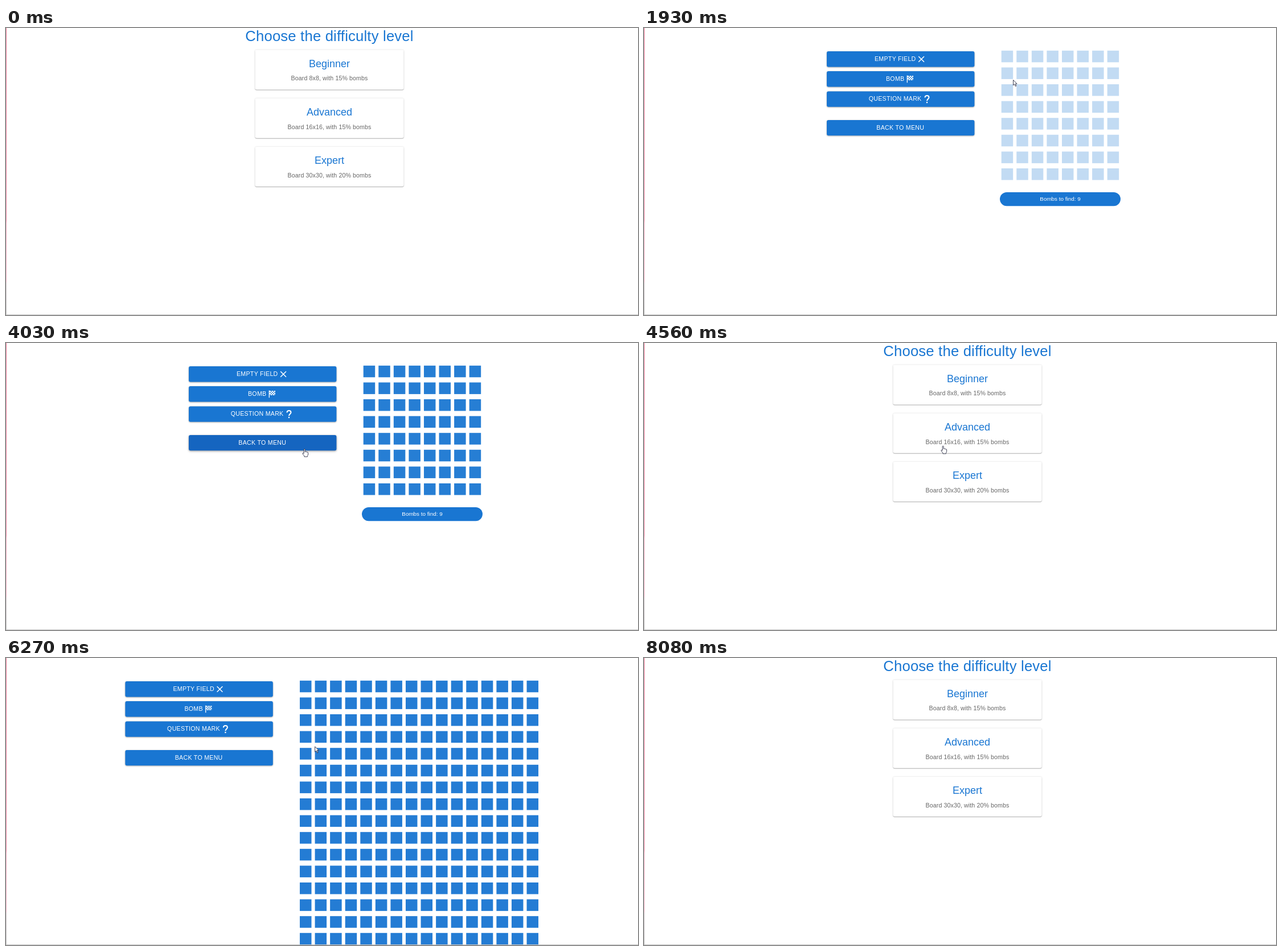
Animation of 1110 by 505 pixels, one loop 8.92 s. Source, as an HTML page:

```html
<!DOCTYPE html>
<html lang="en">
<head>
<meta charset="utf-8">
<title>Minesweeper levels</title>
<style>
  html, body { margin: 0; width: 100%; height: 100%; overflow: hidden; background: #fff; }
  svg { display: block; font-family: "Liberation Sans", Arial, sans-serif; }
  .title { font-size: 25.65px; letter-spacing: .19px; fill: #1976d2; }
  .level { font-size: 18px; fill: #1976d2; }
  .info { font-size: 10.6px; letter-spacing: .12px; fill: #666; }
  .card { fill: #fff; filter: drop-shadow(0 1px .4px rgba(0,0,0,.25)) drop-shadow(0 .3px .9px rgba(0,0,0,.16)); }
  .button { fill: #1976d2; filter: drop-shadow(0 1.2px .8px rgba(0,0,0,.26)) drop-shadow(0 .5px 1px rgba(0,0,0,.12)); }
  .button.hover { fill: #1565c0; filter: drop-shadow(0 1.6px 1.6px rgba(0,0,0,.3)) drop-shadow(0 1px 2px rgba(0,0,0,.14)); }
  .label { font-size: 10.6px; letter-spacing: .3px; fill: #fff; }
  .chip { font-size: 9.9px; fill: #fff; }
  .cell { fill: #1976d2; }
  .mid { text-anchor: middle; }
</style>
</head>
<body>
<svg id="stage" width="1110" height="505" viewBox="0 0 1110 505">
  <defs>
    <linearGradient id="edge" x1="0" y1="0" x2="0" y2="1">
      <stop offset="0" stop-color="#f094ac"/>
      <stop offset=".67" stop-color="#f29fb6"/>
      <stop offset=".68" stop-color="#f3b9ca"/>
      <stop offset=".88" stop-color="#f3c0cf"/>
      <stop offset=".89" stop-color="#dcd3d6"/>
      <stop offset="1" stop-color="#cfcfcf"/>
    </linearGradient>
  </defs>
  <rect width="1110" height="505" fill="#fff"/>
  <g id="menu"></g>
  <g id="game">
    <g id="panel"></g>
    <g id="small"></g>
    <g id="large"></g>
    <g id="counter">
      <rect x="625" y="289" width="212" height="24.2" rx="12.1" fill="#1976d2"/>
      <text class="chip mid" x="731" y="304.3">Bombs to find: 9</text>
    </g>
  </g>
  <rect width="1.3" height="505" fill="url(#edge)"/>
  <rect y="504" width="1110" height="1" fill="#c6c6c6"/>
  <circle id="click" r="9.3" fill="#ebe900" fill-opacity=".54"/>
  <g id="cursor" fill="#fff" stroke="#2b2d45" stroke-width=".9" stroke-linejoin="round">
    <path id="arrow" d="M.5.5V9.8L2.7 7.8 4.4 11.6 5.9 10.9 4.3 7.2H7.1Z"/>
    <path id="hand" d="M-.8 8V1.2Q-.8.2.2.2T1.2 1.2V5Q2.2 4.4 3 5.2 4 4.8 4.7 5.7 6.4 5.4 6.6 7V9.6Q6.5 11.4 5.4 12.2V13.8H-.1V12.4L-3 8.8Q-3.4 7.3-2 7.2Z"/>
  </g>
</svg>
<script>
const LOOP = 8920;
const $ = id => document.getElementById(id);

function add(parent, tag, attrs, text) {
  const el = document.createElementNS("http://www.w3.org/2000/svg", tag);
  for (const key in attrs) el.setAttribute(key, attrs[key]);
  if (text) el.textContent = text;
  parent.appendChild(el);
  return el;
}

const cards = [["Beginner", "8x8", 15], ["Advanced", "16x16", 15], ["Expert", "30x30", 20]].map(([name, size, share], i) => {
  const y = 38.4 + i * 85.3;
  add($("menu"), "rect", { class: "card", x: 437.3, y, width: 261.4, height: 70, rx: 3 });
  add($("menu"), "text", { class: "level mid", x: 568, y: y + 30.4 }, name);
  add($("menu"), "text", { class: "info mid", x: 568, y: y + 53.9 }, `Board ${size}, with ${share}% bombs`);
  return { x: 437.3, y, w: 261.4, h: 70 };
});
add($("menu"), "text", { class: "title mid", x: 568, y: 23 }, "Choose the difficulty level");

const buttons = [["EMPTY FIELD", 41, 405], ["BOMB", 76.1, 425], ["QUESTION MARK", 111.4, 394.7], ["BACK TO MENU", 161.9, 408.3]].map(([name, y, x]) => {
  const el = add($("panel"), "rect", { class: "button", x: 321, y, width: 259.4, height: 27.4, rx: 3 });
  add($("panel"), "text", { class: "label", x, y: y + 17 }, name);
  return { el, x: 321, y, w: 259.4, h: 27 };
});

// Button icons: cross, chequered flag, question mark
const line = (d, width) => add($("panel"), "path", { d, fill: "none", stroke: "#fff", "stroke-width": width });
line("M482.2 50 492 59.8M492 50 482.2 59.8", 1.5);
line("M462.3 83.6V96.2", 1.3);
for (let row = 0; row < 4; row++)
  for (let col = 0; col < 5; col++)
    add($("panel"), "rect", { x: 463 + col * 2, y: 84 + row * 2, width: 2, height: 2, fill: "#fff", "fill-opacity": (row + col) % 2 ? .3 : .95 });
line("M493.5 122.5Q493.5 119 497 119T500.5 122.3C500.5 124.6 497 125 497 128.3", 2);
add($("panel"), "rect", { x: 495.9, y: 129.9, width: 2.2, height: 2.2, fill: "#fff" });

function grid(parent, left, n) {
  for (let i = 0; i < n * n; i++)
    add(parent, "rect", { class: "cell", x: left + i % n * 26.57, y: 39.8 + Math.floor(i / n) * 29.6, width: 20.5, height: 20.5 });
}
grid($("small"), 627.7, 8);
grid($("large"), 516, 16);

// Pointer stops: time, x, y
const path = [
  [390, 1104, 498], [1060, 505, 66], [1450, 505, 66], [1900, 648, 91], [2170, 648, 91],
  [2690, 698, 311], [2930, 698, 311], [3510, 524, 189], [3990, 524, 189], [4040, 524, 186],
  [4350, 524, 186], [4500, 525, 181], [4600, 525, 181], [5030, 548, 154], [6150, 548, 154],
  [6950, 451, 176.5], [7350, 451, 176.5], [7940, 1027, 488], [8080, 1027, 488]
];
const clicks = [[1200, 1400], [3740, 3990], [5230, 5420], [7080, 7290]];
const games = [[1450, 4250], [5500, 7350]];

const during = (spans, t) => spans.some(([a, b]) => t >= a && t < b);
const ramp = (t, a, b) => Math.min(1, Math.max(0, (t - a) / (b - a)));
const ease = u => u * u * (3 - 2 * u);
const show = (el, on) => el.setAttribute("visibility", on ? "inherit" : "hidden");
const inside = (r, x, y) => x >= r.x && x <= r.x + r.w && y >= r.y && y < r.y + r.h;

function pointer(t) {
  let i = 0;
  while (i < path.length - 2 && t >= path[i + 1][0]) i++;
  const [a, x, y] = path[i], [b, x2, y2] = path[i + 1];
  const u = ease(ramp(t, a, b));
  return [x + (x2 - x) * u, y + (y2 - y) * u];
}

function draw(t) {
  const playing = during(games, t), advanced = t >= 5000;
  const shift = advanced ? -111.6 : 0;
  show($("menu"), !playing);
  show($("game"), playing);
  show($("small"), !advanced);
  show($("counter"), !advanced);
  show($("large"), advanced);
  $("panel").setAttribute("transform", `translate(${shift})`);
  $("small").setAttribute("opacity", .94 * ramp(t, 1875, 2075));
  $("large").setAttribute("opacity", .95 * ramp(t, 5950, 6200));

  const [x, y] = pointer(t);
  const visible = t >= 390 && t < 8080;
  let over = !playing && cards.some(c => inside(c, x, y));
  for (const b of buttons) {
    const hit = playing && visible && inside(b, x - shift, y);
    b.el.classList.toggle("hover", hit);
    over = over || hit;
  }
  show($("cursor"), visible);
  show($("arrow"), !over);
  show($("hand"), over);
  $("cursor").setAttribute("transform", `translate(${x} ${y})`);
  $("click").setAttribute("transform", `translate(${x} ${y})`);
  show($("click"), during(clicks, t));
}

let start;
function tick(now) {
  start ??= now;
  draw((now - start) % LOOP);
  requestAnimationFrame(tick);
}
draw(0);
requestAnimationFrame(tick);
</script>
</body>
</html>
```
